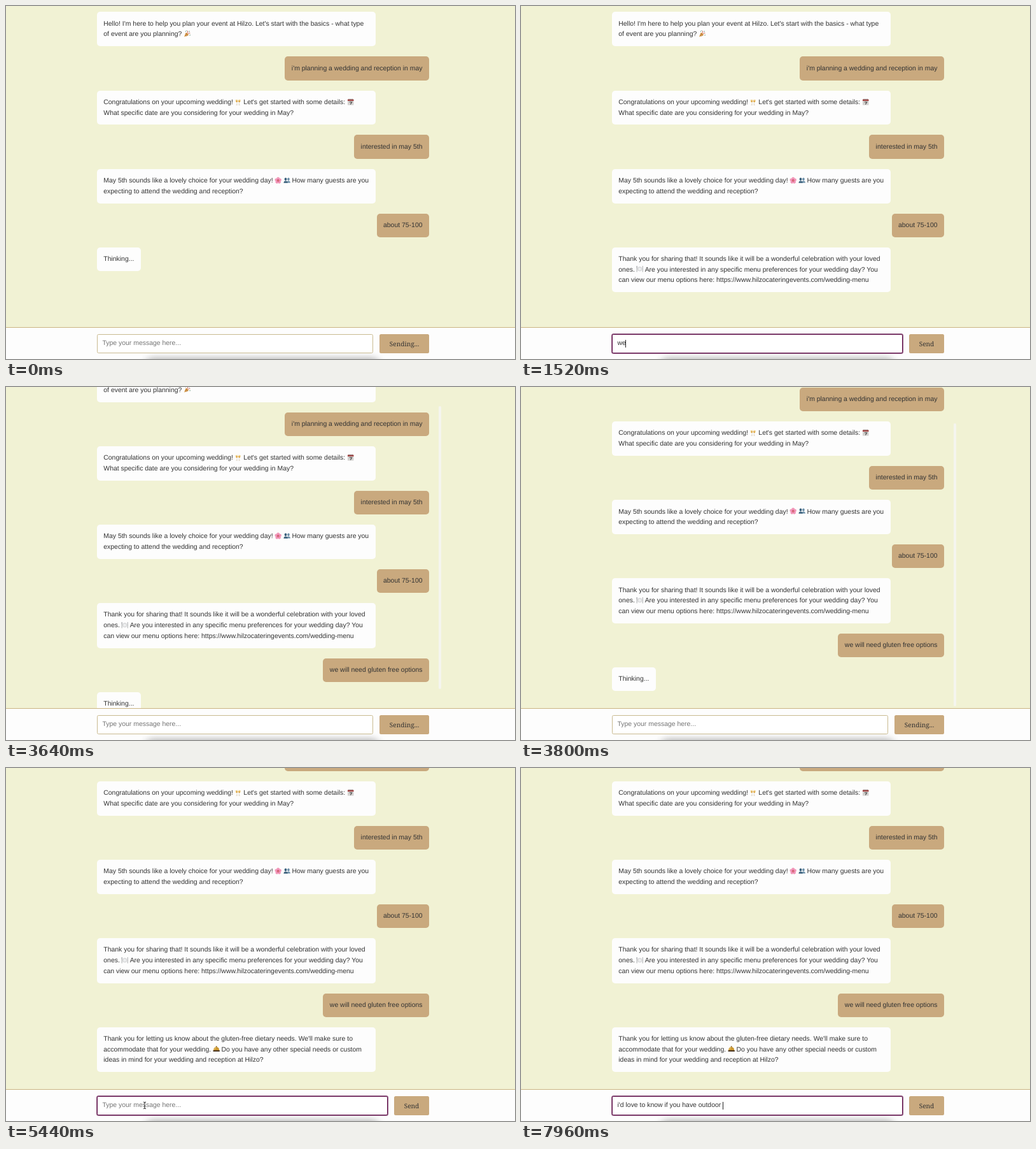
These frames come from a looping animation (800x554 px, 8000 ms). An HTML page:

```html
<!DOCTYPE html>
<html lang="en">
<head>
<meta charset="utf-8">
<title>Event planning chat</title>
<style>
  html, body { margin: 0; width: 100%; height: 100%; overflow: hidden; background: #f1f2d4; }
  #stage {
    position: relative; width: 800px; height: 554px; overflow: hidden; background: #f1f2d4;
    font: 10.44px/16.6px "Liberation Sans", Arial, sans-serif; color: #333;
    text-rendering: geometricPrecision; white-space: pre;
  }
  #stage div, #stage span { box-sizing: border-box; }
  #chat {
    position: absolute; left: 142.9px; top: 9.4px; width: 522px;
    display: flex; flex-direction: column; gap: 15.9px; align-items: flex-start;
  }
  .bubble { padding: 11.4px 10.4px 9.4px; border-radius: 5px; background: #fdfdfd; }
  .wide { width: 438.5px; }
  .user { align-self: flex-end; background: #c9a97e; }
  .icon { width: 11.4px; height: 11.4px; margin: 0 -.4px; vertical-align: -2px; }
  #thumb { position: absolute; left: 680px; width: 4px; border-radius: 2px; background: #f5f5ee; }
  #bar { position: absolute; left: 0; top: 504px; width: 800px; height: 50px; background: #fdfdfd; border-top: 1px solid #cbb483; }
  #shade { position: absolute; left: 222px; top: 557px; width: 362px; height: 20px; border-radius: 10px; box-shadow: 0 0 12px 4px rgba(0, 0, 0, .32); }
  #input {
    position: absolute; left: 143px; top: 515px; height: 30px; border-radius: 2.5px;
    border: 1px solid #c9ba90; background: #fff;
  }
  #input.focus { border-color: #64174f; box-shadow: 0 0 0 1px rgba(100, 23, 79, .7); }
  #field { position: absolute; left: 151.5px; top: 522.3px; }
  #field.empty { color: #757575; }
  #caret { position: absolute; top: 524px; width: 1px; height: 12px; background: #222; }
  #button {
    position: absolute; right: 135px; top: 515px; height: 30px; border-radius: 2.5px; background: #c9a97e;
    font: 500 10.1px/30px "Noto Serif", serif; text-align: center; color: #333;
  }
  #pointer { position: absolute; left: 214px; top: 523px; width: 8px; height: 13px; }
</style>
</head>
<body>
<svg width="0" height="0" style="position:absolute">
  <symbol id="popper" viewBox="0 0 12 12">
    <path d="M1 11 4 4Q8 5 8.3 8.2Z" fill="#d9a14e"/>
    <path d="M2.5 7.5 5 10M3.5 5.2 7 9" stroke="#a8642f"/>
    <path d="M6 5Q8 3 6.5 1M7.5 6Q9 4 11 5" fill="none" stroke="#c4574d"/>
    <path d="M3 2h1M9 2h1.4M10 8h1.3M4.6 .8h1" stroke="#5c8f78" stroke-width="1.2"/>
  </symbol>
  <symbol id="toast" viewBox="0 0 12 12">
    <path d="M1.5 2.5 5 1.5 5.6 5Q4.5 7.2 2.8 6ZM7 1.5 10.5 2.5 9.3 6Q7.3 7.2 6.4 5Z" fill="#f0d9a0"/>
    <path d="M2 4 5.4 3.3 5.6 5Q4.5 7.2 2.8 6ZM6.7 3.3 10 4 9.3 6Q7.3 7.2 6.4 5Z" fill="#dfaa4d"/>
    <path d="M4.2 6.5V10.5M2.6 10.8H5.2M7.8 6.5V10.5M6.8 10.8H9.4" stroke="#d6cbb4" stroke-width=".8"/>
  </symbol>
  <symbol id="calendar" viewBox="0 0 12 12">
    <path d="M1 2H11V11H1Z" fill="#d4d2d0"/>
    <path d="M1 1.5H11V4.3H1Z" fill="#a84443"/>
    <path d="M3 .7V2.6M5 .7V2.6M7 .7V2.6M9 .7V2.6" stroke="#555" stroke-width=".7"/>
    <path d="M4 6H8L5.6 10" fill="none" stroke="#474747" stroke-width="1.2"/>
  </symbol>
  <symbol id="blossom" viewBox="0 0 12 12">
    <g fill="#f197b8"><circle cx="6" cy="3" r="2.5"/><circle cx="9" cy="5.2" r="2.5"/><circle cx="7.9" cy="8.8" r="2.5"/><circle cx="4.1" cy="8.8" r="2.5"/><circle cx="3" cy="5.2" r="2.5"/></g>
    <circle cx="6" cy="6.2" r="1.9" fill="#c63f70"/><circle cx="6" cy="6.2" r=".8" fill="#f5d26c"/>
  </symbol>
  <symbol id="guests" viewBox="0 0 12 12">
    <g fill="#6c8fa8"><ellipse cx="8.4" cy="4" rx="1.9" ry="2.3"/><path d="M5.5 10Q5.5 6.8 8.4 6.8T11.5 10Z"/></g>
    <g fill="#3d627d"><ellipse cx="3.7" cy="4" rx="2" ry="2.4"/><path d="M.5 10.3Q.5 6.8 3.7 6.8T7 10.3Z"/></g>
  </symbol>
  <symbol id="plate" viewBox="0 0 12 12">
    <circle cx="6" cy="6" r="3.8" fill="#d8d9da"/><circle cx="6" cy="6" r="2.3" fill="#eeeff0"/>
    <path d="M1.2 1V11M10.8 1V11" stroke="#a5a7a9"/><path d="M.7 1V4.5M1.8 1V4.5" stroke="#b9bbbd" stroke-width=".6"/>
  </symbol>
  <symbol id="bell" viewBox="0 0 12 12">
    <path d="M1.2 8.4Q1.4 3.2 6 3.2T10.8 8.4Z" fill="#c9952f"/>
    <path d="M3 7Q3.3 4.6 5.5 4.2" fill="none" stroke="#f2d57c"/>
    <path d="M5 1.6H7V3.2H5Z" fill="#8a6424"/><path d="M.6 8.3H11.4V10.5H.6Z" fill="#4a3520"/>
  </symbol>
  <symbol id="beam" viewBox="0 0 8 13">
    <path d="M2 1.2Q4 1.2 4 2.6Q4 1.2 6 1.2M4 2.4V10.6M2 11.8Q4 11.8 4 10.4Q4 11.8 6 11.8M3 7.6H5" fill="none"/>
  </symbol>
</svg>
<div id="stage">
  <div id="chat"></div>
  <div id="thumb"></div>
  <div id="bar"></div>
  <div id="shade"></div>
  <div id="input"></div>
  <span id="field"></span>
  <div id="caret"></div>
  <div id="button"></div>
  <svg id="pointer"><use href="#beam" stroke="#fff" stroke-width="2"/><use href="#beam" stroke="#222"/></svg>
</div>
<script>
const LOOP = 8000;
const REPLY_1 = 400, SENT = 3520, REPLY_2 = 4160;
const $ = id => document.getElementById(id);
const icon = id => `<svg class="icon"><use href="#${id}"/></svg>`;
const clamp = x => Math.min(1, Math.max(0, x));
const within = (t, from, to) => t >= from && t < to;

const messages = [];
function say(style, html, from = 0, until = LOOP) {
  const el = document.createElement('div');
  el.className = 'bubble ' + style;
  el.innerHTML = html;
  $('chat').append(el);
  messages.push({ el, from, until });
}

say('wide', `Hello! I'm here to help you plan your event at Hilzo. Let's start with the basics - what type\nof event are you planning? ${icon('popper')}`);
say('user', "i'm planning a wedding and reception in may");
say('wide', `Congratulations on your upcoming wedding! ${icon('toast')} Let's get started with some details: ${icon('calendar')}\nWhat specific date are you considering for your wedding in May?`);
say('user', 'interested in may 5th');
say('wide', `May 5th sounds like a lovely choice for your wedding day! ${icon('blossom')} ${icon('guests')} How many guests are you\nexpecting to attend the wedding and reception?`);
say('user', 'about 75-100');
say('', 'Thinking...', 0, REPLY_1);
say('wide', `Thank you for sharing that! It sounds like it will be a wonderful celebration with your loved\nones. ${icon('plate')} Are you interested in any specific menu preferences for your wedding day? You\ncan view our menu options here: https://www.hilzocateringevents.com/wedding-menu`, REPLY_1);
say('user', 'we will need gluten free options', SENT);
say('', 'Thinking...', SENT, REPLY_2);
say('wide', `Thank you for letting us know about the gluten-free dietary needs. We'll make sure to\naccommodate that for your wedding. ${icon('bell')} Do you have any other special needs or custom\nideas in mind for your wedding and reception at Hilzo?`, REPLY_2);

// Each draft lists [time, characters typed], interpolated between points.
const drafts = [
  { text: 'we will need gluten free options', pointer: 880, focus: 1120, end: SENT,
    keys: [[1360, 0], [1520, 2.3], [2920, 21.3], [3440, 32]] },
  { text: "i'd love to know if you have outdoor ", pointer: 4280, focus: 4680, end: LOOP,
    keys: [[5860, 0], [6600, 12.4], [7960, 37.4]] },
];

function typed(keys, t) {
  let count = 0;
  for (let i = 1; i < keys.length; i++) {
    const [t0, n0] = keys[i - 1], [t1, n1] = keys[i];
    count += (n1 - n0) * clamp((t - t0) / (t1 - t0));
  }
  return Math.floor(count + 1e-6);
}

function glide(t, start, length) {
  const p = clamp((t - start) / length);
  return p * p * (3 - 2 * p);
}

function drawChat(t) {
  for (const { el, from, until } of messages) el.style.display = within(t, from, until) ? '' : 'none';
  const limit = t < REPLY_2 ? 78.5 : 111.7;
  const scroll = 78.5 * glide(t, SENT, 240) + 33.2 * glide(t, REPLY_2, 150);
  $('chat').style.top = 9.4 - scroll + 'px';

  const height = 258630 / (504 + limit);
  const thumb = $('thumb').style;
  thumb.height = height + 'px';
  thumb.top = 3 + (498 - height) * scroll / limit + 'px';
  thumb.opacity = t < SENT ? 0 : 1 - clamp((t - 4760) / 200);
}

function drawInput(t) {
  const sending = t < REPLY_1 || within(t, SENT, REPLY_2);
  $('button').textContent = sending ? 'Sending...' : 'Send';
  $('button').style.width = (sending ? 78 : 55) + 'px';
  $('input').style.width = (sending ? 434 : 457) + 'px';

  const draft = drafts.find(d => within(t, d.pointer, d.end));
  const focused = !!draft && t >= draft.focus;
  const text = draft ? draft.text.slice(0, typed(draft.keys, t)) : '';
  const field = $('field');
  field.textContent = text || 'Type your message here...';
  field.className = text ? '' : 'empty';
  $('input').className = focused ? 'focus' : '';

  const blinkOn = focused && (text || (t - draft.focus) % 1000 < 500);
  $('caret').style.display = blinkOn ? '' : 'none';
  $('caret').style.left = 151 + (text ? field.getBoundingClientRect().width : 0) + 'px';
  $('pointer').style.display = draft && !text ? '' : 'none';
}

function frame() {
  const t = performance.now() % LOOP;
  drawChat(t);
  drawInput(t);
  requestAnimationFrame(frame);
}
frame();
</script>
</body>
</html>
```
